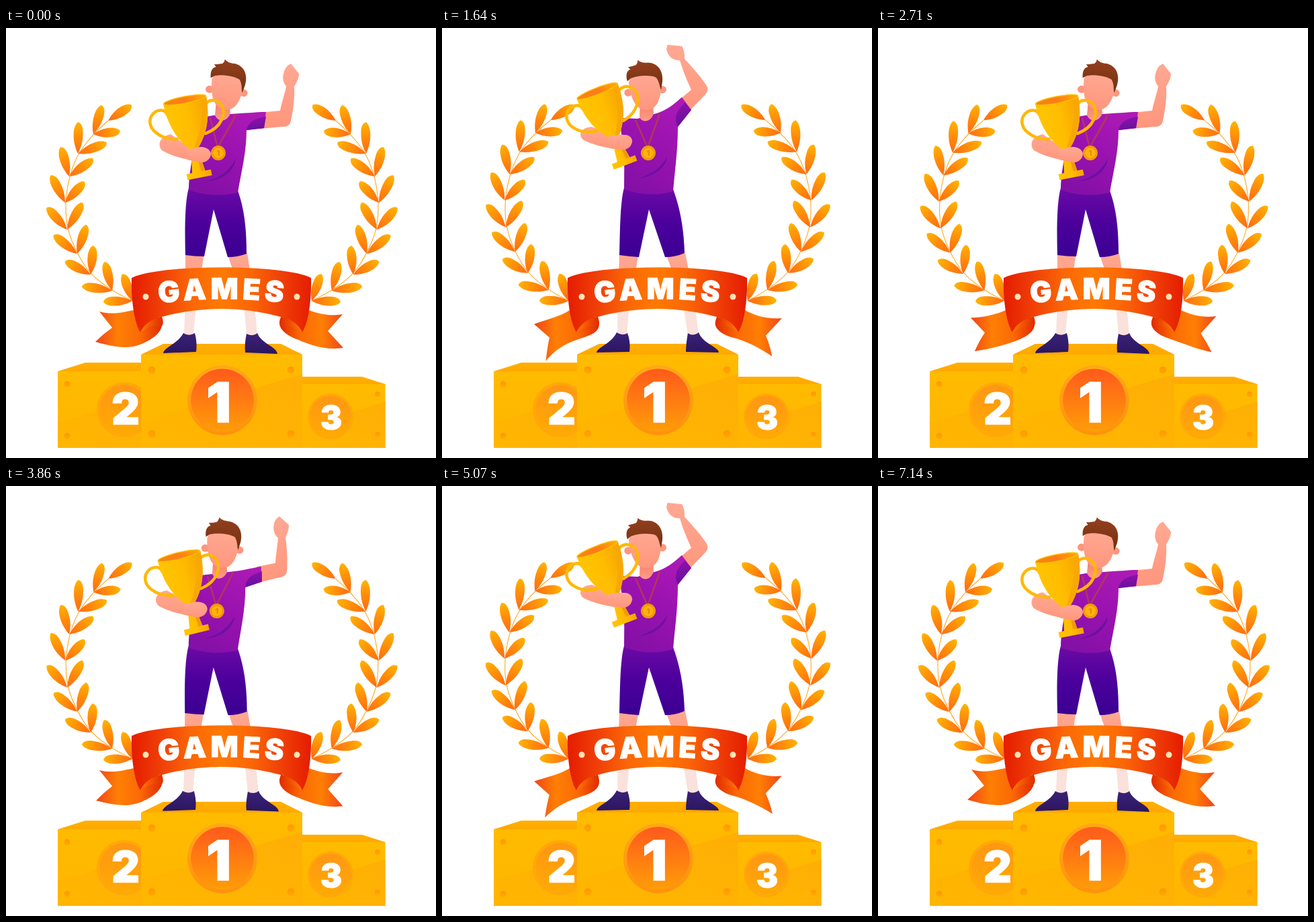
Write an HTML page that moves like this. It is 640 by 640 pixels and loops after 7.21 s.

```html
<!DOCTYPE html>
<html lang="en">
<head>
<meta charset="utf-8">
<title>Winner on the podium</title>
<style>
html, body { margin: 0; width: 100%; height: 100%; overflow: hidden; background: #fff; }
svg { display: block; width: 100vw; height: 100vh; }
text { font-family: Inter, "Open Sans", sans-serif; font-weight: 900; fill: #fff; text-anchor: middle; }
</style>
</head>
<body>
<svg id="stage" viewBox="0 0 640 640">
  <defs id="defs"><path id="arc" d="M205 413Q323 394 441 413"/></defs>
</svg>
<script>
const LOOP = 7210, STEP = LOOP / 101, SWING = LOOP / 2;
const stage = document.getElementById('stage');
const defs = document.getElementById('defs');

function add(parent, tag, attrs, text) {
  const el = document.createElementNS('http://www.w3.org/2000/svg', tag);
  for (const key in attrs) el.setAttribute(key, attrs[key]);
  if (text) el.textContent = text;
  parent.append(el);
  return el;
}
const path = (parent, d, fill, extra) => add(parent, 'path', { d, fill, ...extra });
const circle = (parent, cx, cy, r, fill, extra) => add(parent, 'circle', { cx, cy, r, fill, ...extra });
const group = parent => add(parent, 'g');

// Direction is given in bounding box units: x1 y1 x2 y2
function gradient(id, [x1, y1, x2, y2], ...stops) {
  const g = add(defs, 'linearGradient', { id, x1, y1, x2, y2 });
  stops.forEach((color, i) => add(g, 'stop', { offset: i / (stops.length - 1), 'stop-color': color }));
  return `url(#${id})`;
}
const down = [0, 0, 0, 1], across = [0, 0, 1, 0];
const paint = {
  leaf: gradient('leaf', across, '#ff6a12', '#ff8c0a', '#ffb400'),
  front: gradient('front', down, '#ffbb00', '#ffb600'),
  top: gradient('top', down, '#ffb000', '#ffa800'),
  shade: gradient('shade', [1, 0, 0, 1], '#ffae05', '#ffb700'),
  disc: gradient('disc', down, '#ff5a1b', '#ff9d08'),
  paleDisc: gradient('paleDisc', down, '#ff9614', '#ffaa04'),
  ring: gradient('ring', down, '#ffa818', '#ff920c'),
  bolt: gradient('bolt', down, '#ff9608', '#ffa800'),
  band: gradient('band', across, '#e51c00', '#f04008', '#fb6606', '#ff7a02', '#fb6606', '#f04008', '#e51c00'),
  tailLeft: gradient('tailLeft', across, '#f0441a', '#ff7f04', '#fb6a06', '#e22800'),
  tailRight: gradient('tailRight', across, '#e22800', '#fb6a06', '#ff7f04', '#f0441a'),
  roll: gradient('roll', across, '#ff7a0a', '#e02a00'),
  rollRight: gradient('rollRight', across, '#e02a00', '#ff7a0a'),
  skin: gradient('skin', down, '#ffa893', '#ff967c'),
  neck: gradient('neck', down, '#ee7b66', '#ff9c84'),
  hair: gradient('hair', down, '#95401f', '#70300f'),
  shirt: gradient('shirt', [0.8, 0, 0.3, 1], '#ad1ab5', '#9a12b0', '#8410a6'),
  sleeve: gradient('sleeve', down, '#8a12aa', '#6a109e'),
  shorts: gradient('shorts', down, '#6b0aa6', '#4c009c', '#3b0092'),
  shoe: gradient('shoe', down, '#3a2278', '#2c1660'),
  gold: gradient('gold', across, '#ffc400', '#ffbd00', '#f7a300'),
  cup: gradient('cup', across, '#f08a10', '#ff7a18', '#ffae00')
};

// Each morphing part blends the numbers of two paths
const morphs = [];
function morph(parent, kind, from, to, fill, extra) {
  const target = to.match(/-?[\d.]+/g);
  morphs.push({ el: path(parent, from, fill, extra), kind, from, target });
}
function blend(from, target, p) {
  let i = 0;
  return from.replace(/-?[\d.]+/g, n => (+n + (target[i++] - n) * p).toFixed(2));
}

// Laurel: stem node, outer tip, inner tip
const laurel = [
  [188, 406, 145, 407, 174, 366], [158, 391, 113, 384, 147, 348],
  [126, 367, 88, 347, 130, 324], [106, 336, 71, 308, 120, 293],
  [91, 300, 61, 267, 114, 260], [88, 260, 67, 219, 117, 229],
  [94, 221, 82, 177, 130, 195], [107, 187, 108, 140, 150, 171],
  [130, 158, 143, 115, 170, 154], [152, 138, 187, 115]
];
function branch(parent) {
  const g = group(parent);
  let d = 'M188 406';
  laurel.slice(1).forEach(([x, y], i) => {
    const [px, py] = laurel[i];
    d += `Q${px} ${py} ${(px + x) / 2} ${(py + y) / 2}`;
  });
  path(g, d + 'L152 138', 'none', { stroke: '#ffb030', 'stroke-width': 1.2 });
  for (const [x, y, ...tips] of laurel)
    for (let i = 0; i < tips.length; i += 2) {
      const dx = tips[i] - x, dy = tips[i + 1] - y;
      const turn = Math.atan2(dy, dx) * 180 / Math.PI;
      path(g, 'M0 0C9 -5 18 -8 29 -7.500C37 -7 42 -4 44 -1C43 4 38 7.500 29 7.500C18 8 9 5 0 0Z', paint.leaf,
        { transform: `translate(${x} ${y}) rotate(${turn}) scale(${Math.hypot(dx, dy) / 44} 0.92)` });
    }
  return g;
}
const leftBranch = branch(stage);
const rightBranch = branch(add(stage, 'g', { transform: 'matrix(-1 0 0 1 643 0)' }));

// Podium
function block(top, front, shade, bolts, size) {
  path(stage, top, paint.top);
  path(stage, front, paint.front);
  path(stage, shade, paint.shade);
  bolts.forEach(([x, y]) => circle(stage, x, y, size, paint.bolt));
}
function badge(x, y, r, fill, ring, label, labelX, baseline, size) {
  circle(stage, x, y, r, ring);
  circle(stage, x, y, r * 0.9, fill);
  add(stage, 'text', { x: labelX, y: baseline, 'font-size': size, stroke: '#fff', 'stroke-width': 1.2 }, label);
}
block('M77 511L118 498H201V511Z', 'M77 511H201V625H77Z', 'M77 587L201 552V625H77Z', [[91, 530], [91, 607]], 4.5);
badge(176, 568, 41, paint.paleDisc, '#ffa808', '2', 178, 589.5, 65);
block('M441 519H530L564.500 530H441Z', 'M441 530H564.500V625H441Z', 'M441 594L564.500 556V625H441Z', [[553, 545], [553, 605]], 4);
badge(483, 578, 34, paint.paleDisc, '#ffa808', '3', 484, 596.5, 48);
block('M201 486L234 470H409L441 486Z', 'M201 486H441V625H201Z', 'M201 586L441 515V625H201Z',
  [[217, 509], [424, 509], [217, 604], [424, 604]], 5.5);
badge(322, 554, 52, paint.disc, paint.ring, '1', 316.5, 586.5, 82);

// Winner
const man = group(stage);
morph(man, 'body', 'M267 335L295 335L284 405L267 405Z', 'M264 335L293 335L280 405L262 405Z', paint.skin);
morph(man, 'body', 'M330 338L359 335L370 405L353 405Z', 'M334 338L362 335L376 405L358 405Z', paint.skin);
morph(man, 'body', 'M267 400L284 400L279 457L265 457Z', 'M262 400L280 400L275 457L261 457Z', '#fae1dc');
morph(man, 'body', 'M353 400L369 400L374 457L358 457Z', 'M357 400L375 400L382 457L366 457Z', '#fae1dc');
morph(man, 'body',
  'M264 454C270 458 276 457 281 454C284 465 284 474 283 482L234 484C235 475 256 470 264 454Z',
  'M260 453C266 457 272 457 276 454C280 465 280 474 279 482L230 483C231 475 252 470 260 453Z', paint.shoe);
morph(man, 'body',
  'M358 455C363 458 370 458 374 454C380 470 403 474 404 485L356 483C355 474 356 465 358 455Z',
  'M366 454C371 458 378 457 382 453C388 470 411 474 412 483L363 482C363 474 364 465 366 454Z', paint.shoe);
morph(man, 'body',
  'M272 238C266 260 266 300 267 338Q281 340 295 340L309 270L330 341Q345 341 358 336C358 300 355 270 345 242Z',
  'M271 238C265 260 265 300 264 338Q278 340 293 341L308 270L332 341Q347 341 361 335C360 300 355 270 344 240Z', paint.shorts);
const raisedArm = group(man);
morph(raisedArm, 'arm',
  'M378 126L408 123C411 108 415 98 417 87C410 78 412 70 415 62C418 56 421 55 424 53L436 68C436 75 432 82 429 87C430 105 427 125 424 138C422 147 416 147 410 147L378 150Z',
  'M352 108L371 92C364 77 358 62 354 48C342 48 337 42 334 32C335 28 335 25 336 25L357 27C361 34 361 40 361 46C372 58 385 72 394 86C398 93 393 98 388 103L362 130Z', paint.skin);
morph(man, 'body',
  'M309 130L335 128C355 127 372 125 387 125L384 149L358 152C358 185 350 215 345 245C320 251 295 249 272 241C272 220 276 200 280 180L290 150L292 133Z',
  'M291 135L316 128C332 124 345 114 357 103L371 122L351 147C351 185 346 215 344 243C320 250 295 249 271 240C271 220 272 200 270 180L266 150L270 134Z', paint.shirt);
morph(man, 'body', 'M387 132C372 134 360 140 358 152L384 149Z', 'M362 111C350 122 344 132 351 147L371 122Z', paint.sleeve);
morph(man, 'body',
  'M342 194C340 215 318 228 298 228C322 222 334 210 342 194Z',
  'M335 192C333 210 312 222 292 224C316 216 327 206 335 192Z', '#6d10a2');
morph(man, 'body',
  'M313 108L311 130C316 141 329 140 334 127L332 112Z',
  'M295 108L294 133C299 142 311 140 315 127L314 112Z', paint.neck);
morph(man, 'body', 'M304 134L315 178L343 128', 'M288 137L306 178L324 128', 'none',
  { stroke: '#b0365a', 'stroke-width': 2.6 });

const medal = group(man);
circle(medal, 0, 0, 11, '#f59a08');
circle(medal, 0, 0, 8.5, '#ffb30a', { stroke: '#ef8a10', 'stroke-width': 1 });
add(medal, 'text', { y: 4, 'font-size': 11, style: 'fill:#ee8810' }, '1');

const head = group(man);
for (const x of [-26, 25]) add(head, 'ellipse', { cx: x, cy: 2, rx: 6, ry: 5.5, fill: '#ff957e' });
path(head, 'M-24 -14C-24 8 -18 30 0 30C18 30 24 8 24 -16C10 -30 -18 -28 -24 -14Z', paint.skin);
path(head, 'M-26 -15C-28 -25 -25 -31 -20 -32L-23 -36C-18 -36 -15 -37 -11 -38C-9 -40 -8 -42 -8 -45C-4 -41 1 -40 6 -40C21 -39 29 -26 26 -10L23 2C21 -2 22 -10 17 -17C8 -22 -10 -22 -20 -19Z', paint.hair);

morph(man, 'body',
  'M245 158C228 162 225 174 232 182C245 190 262 194 285 199L290 179L262 170Z',
  'M222 147C205 149 202 160 211 167C225 174 240 177 260 181L266 160L240 152Z', paint.skin);

const trophy = group(man);
for (const side of [1, -0.94])
  path(trophy, 'M-30 16C-31 9 -39 7 -46 9C-60 15 -60 30 -51 40C-44 49 -35 53 -22 55', 'none',
    { stroke: '#ffb806', 'stroke-width': 4.5, 'stroke-linecap': 'round', transform: `scale(${side} 1)` });
path(trophy, 'M-5 68H5L6 82L10 110H-10L-6 82Z', paint.gold);
path(trophy, 'M2 70H5L6 82L10 110H4Z', '#f09a08');
path(trophy, 'M-32.500 0C-32 34 -22 56 -7 73H7C22 56 32 34 32.500 0Z', paint.gold);
path(trophy, 'M32.500 0C32 34 22 56 7 73H0C15 50 22 30 25 4Z', '#f8a805');
add(trophy, 'ellipse', { rx: 32, ry: 5, fill: paint.cup, stroke: '#ffc000', 'stroke-width': 1.5 });
path(trophy, 'M-18.500 109H18.500V118H-18.500Z', paint.gold);

morph(man, 'body',
  'M270 180C277 181 282 177 290 177C299 177 305 182 305 188C304 196 297 201 288 200L270 196Z',
  'M248 160C255 161 262 158 270 159C279 158 284 164 283 170C281 178 275 182 266 181L248 178Z', paint.skin);

// Ribbon
morph(stage, 'ribbon',
  'M139 422C160 428 178 422 190 420L232 432C236 450 222 462 200 471C180 479 158 474 133 467Q145 455 158 446Z',
  'M137 441C155 434 175 430 190 420L232 432C240 452 222 457 203 463C180 470 165 483 155 496Q157 475 160 461Z', paint.tailLeft);
morph(stage, 'ribbon',
  'M501 426C480 430 462 424 451 420L409 432C402 445 415 457 435 464C455 473 478 480 502 476Q490 463 479 451Z',
  'M506 432C485 434 465 428 451 420L409 432C401 445 415 455 430 460C455 466 475 478 491 489Q488 472 482 458Z', paint.tailRight);
path(stage, 'M200 453C205 440 222 430 232 430C237 443 231 448 222 443C214 444 208 448 200 453Z', paint.roll);
path(stage, 'M441 453C436 440 419 430 409 430C404 443 410 448 419 443C427 444 433 448 441 453Z', paint.rollRight);
path(stage, 'M187 372C225 351 416 351 454 372C455 410 449 440 441 453C436 440 420 431 409 430C350 414 291 414 232 430C221 431 205 440 200 453C192 440 186 410 187 372Z', paint.band);
for (const x of [208, 433]) circle(stage, x, 400, 4.5, '#ffe2b5');
const title = add(stage, 'text', { 'font-size': 43, 'letter-spacing': 6, stroke: '#fff', 'stroke-width': 1 });
add(title, 'textPath', { href: '#arc', startOffset: '50%' }, 'GAMES');

const ease = u => (1 - Math.cos(Math.PI * Math.min(1, Math.max(0, u)))) / 2;
const lerp = (a, b, p) => a + (b - a) * p;
function place(el, [x, y, r], [x2, y2, r2], p) {
  el.setAttribute('transform', `translate(${lerp(x, x2, p)} ${lerp(y, y2, p)}) rotate(${lerp(r, r2, p)})`);
}

function draw(time) {
  const t = Math.floor((time % LOOP + 2) / STEP) * STEP % SWING;
  const pose = {
    body: ease(t / 760) - ease((t - 1800) / 805),
    arm: ease(t / 865) - ease((t - 1800) / 830),
    ribbon: (1 - Math.cos(2 * Math.PI * t / SWING)) / 2
  };
  for (const m of morphs) m.el.setAttribute('d', blend(m.from, m.target, pose[m.kind]));
  place(head, [329, 92, 6], [303, 92, -5], pose.body);
  place(medal, [316, 186, 0], [307, 186, 0], pose.body);
  place(trophy, [266, 107, -11], [231, 94, -21], pose.body);
  raisedArm.setAttribute('transform', `translate(0 ${-4 * Math.sin(Math.PI * pose.arm)})`);
  for (const b of [leftBranch, rightBranch])
    b.setAttribute('transform', `rotate(${2.1 * pose.ribbon} 188 408)`);
}

const start = performance.now();
function tick() {
  draw(performance.now() - start);
  requestAnimationFrame(tick);
}
tick();
</script>
</body>
</html>
```
